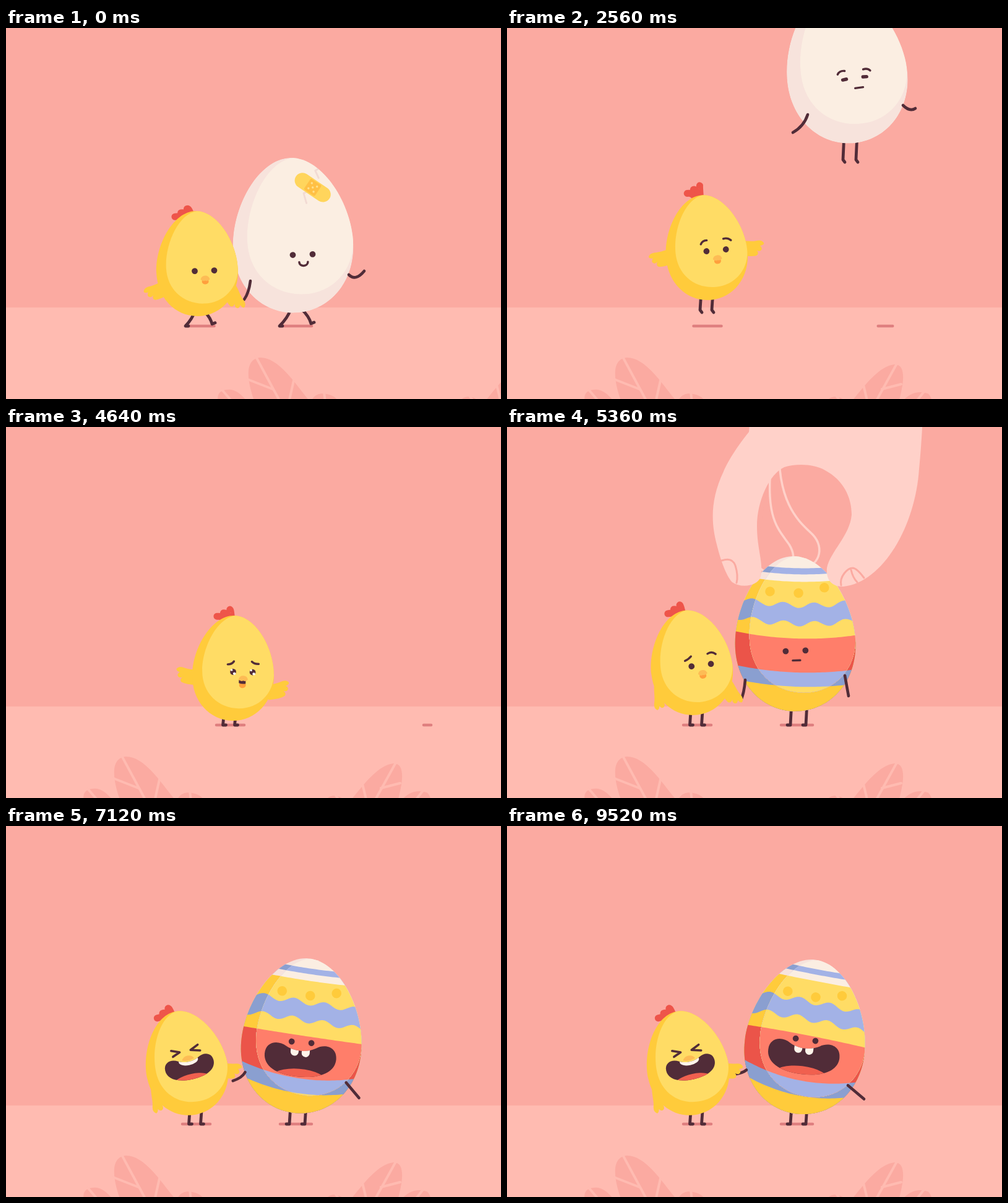
Write an HTML page with a canvas that moves like this. It is 800x600 px and loops after 9600 ms.

```html
<!DOCTYPE html>
<html lang="en">
<head>
<meta charset="utf-8">
<title>Chick and egg</title>
<style>
  html, body { margin: 0; width: 100%; height: 100%; overflow: hidden; background: #fbaaa1; }
  canvas { display: block; width: 800px; height: 600px; }
</style>
</head>
<body>
<canvas id="stage" width="800" height="600"></canvas>
<script>
const LOOP = 9600, STEP = 80;
const WALL = '#fbaaa1', FLOOR = '#ffbbb1', SKIN = '#ffd1c9', INK = '#512c38';
const SUN = '#ffdc65', AMBER = '#ffcb3b', RED = '#ee554a', CREAM = '#fbeee2', BLUSH = '#f7e3dc';
const LIT = { white: CREAM, blue: '#a3b2e6', yellow: SUN, red: '#ff7e6a' };
const DIM = { white: BLUSH, blue: '#8a9fd0', yellow: AMBER, red: '#eb5449' };

const ctx = document.getElementById('stage').getContext('2d');
const path = d => typeof d === 'string' ? new Path2D(d) : d;

function fill(d, color) { ctx.fillStyle = color; ctx.fill(path(d)); }
function line(d, width = 4, color = INK) {
  ctx.lineWidth = width;
  ctx.strokeStyle = color;
  ctx.stroke(path(d));
}
function oval(x, y, rx, ry, color) {
  ctx.fillStyle = color;
  ctx.beginPath();
  ctx.ellipse(x, y, rx, ry, 0, 0, 7);
  ctx.fill();
}
const dot = (x, y, r, color) => oval(x, y, r, r, color);
function at(x, y, deg, draw, sx = 1, sy = sx) {
  ctx.save();
  ctx.translate(x, y);
  ctx.rotate(deg * Math.PI / 180);
  ctx.scale(sx, sy);
  draw();
  ctx.restore();
}
function clipped(shape, draw) {
  ctx.save();
  ctx.clip(shape);
  draw();
  ctx.restore();
}

const mix = (a, b, u) => a + (b - a) * u;
function ramp(t, from, to) {
  const u = Math.min(1, Math.max(0, (t - from) / (to - from)));
  return u * u * (3 - 2 * u);
}

const SHELL = new Path2D('M0-97C35-97 66-45 66 0C66 42 37 73 0 73C-37 73-66 42-66 0C-66-45-35-97 0-97Z');
const GLOW = new Path2D('M4-97C-26-95-50-47-50-8C-50 29-23 53 10 53C42 53 66 28 66-4L90-4V-110H4Z');
function enlarge(p) {
  const q = new Path2D();
  q.addPath(p, new DOMMatrix().scale(1.475));
  return q;
}
const BIG_SHELL = enlarge(SHELL), BIG_GLOW = enlarge(GLOW);

// How far each part of the story has come, 0 to 1.
function story(t) {
  const back = ramp(t, 4720, 5200);
  const lifted = ramp(t, 2160, 2960), lowered = ramp(t, 4640, 5360);
  return {
    t, lifted, lowered, back,
    walk: 1 - ramp(t, 960, 1200),
    stop: ramp(t, 1040, 1360),
    away: ramp(t, 2240, 3040) - back,
    spread: ramp(t, 2240, 2560) - back,
    cry: ramp(t, 4240, 4480),
    reach: ramp(t, 960, 1680),
    grip: ramp(t, 1680, 1960),
    leave: ramp(t, 5600, 6320),
    gone: ramp(t, 2160, 2960) - ramp(t, 4240, 5360),
    hold: 1 - ramp(t, 2080, 2320) + ramp(t, 5360, 5680),
    giggle: ramp(t, 6560, 6800),
    roar: ramp(t, 6960, 7200),
    rock: .5 - .5 * Math.cos((t - 8040) / 400 * 2 * Math.PI),
    hop: t > 2480 && t < 4400 ? 52 * Math.abs(Math.sin(Math.PI * (t - 2480) / 480)) : 0,
    pace: t / 560 * 2 * Math.PI,
    painted: t >= 3600
  };
}

function handPose(s) {
  return s.painted
    ? { x: 90 - 124 * s.lowered + 79 * s.leave, y: -480 + 548 * s.lowered - 289 * s.leave }
    : { x: 20 - 20 * s.reach - 45 * s.grip + 190 * s.lifted, y: -210 + 210 * s.reach + 70 * s.grip - 550 * s.lifted };
}

function eggPose(s, hand) {
  const held = s.t >= 2160 && s.t < 5600;
  const x = held ? hand.x + 500 : s.painted ? 466 : 464 - 9 * s.stop;
  const y = held ? hand.y + 284 : s.painted ? 352 : 353 + s.stop;
  return {
    ground: x + (s.painted ? 2.5 : 5.5),
    air: Math.max(0, 348 - y),
    x: mix(x, 485.7 - 7.2 * s.rock, s.roar),
    y: mix(y, 358.5, s.roar) - 3 * s.walk * Math.abs(Math.sin(s.pace)),
    turn: s.painted ? mix(-2, 9.3 - 3.6 * s.rock, s.roar) : -2 - 6 * s.stop,
    fx: s.painted ? 0 : 15 - 4 * s.stop,
    fy: s.painted ? 10 - 23 * s.roar : 14 - 10 * s.stop
  };
}

function chickPose(s) {
  const x = 309 - 10 * s.stop + 68 * s.away;
  const y = 393 + 9 * s.cry * (1 - s.back);
  const turn = -2 - 7 * s.stop + 10 * s.away + 2 * s.back;
  return {
    ground: x + 5 + 3.5 * s.stop - 13 * s.away - s.hop * .11,
    x: mix(x, 305.9 - 19.8 * s.rock, s.giggle),
    y: mix(y, 391.5 + 5.4 * s.rock, s.giggle) - 3 * s.walk * Math.abs(Math.sin(s.pace)) - s.hop,
    turn: mix(turn, -2.6 - 14.4 * s.rock, s.giggle),
    fx: 4 * s.stop - 4,
    fy: -6 * s.stop
  };
}

function leaves(dx) {
  at(dx, 0, 0, () => {
    fill('M185 605C172 570 168 535 194 533C225 533 252 578 275 605Z', WALL);
    fill('M126 605C122 587 135 584 147 585C158 587 165 595 174 605Z', WALL);
    fill('M275 605C282 592 290 590 301 592C311 594 316 597 321 605Z', WALL);
    fill('M556 605C575 583 600 546 627 544C645 545 642 572 633 605Z', WALL);
    fill('M515 605C522 595 535 592 549 605Z', WALL);
    fill('M638 605C650 590 665 586 680 591C686 595 687 605 686 605Z', WALL);
    line('M186 530L228 608M173 568L214 584M248 570L240 606M132 585L150 606M297 588L299 606', 4, FLOOR);
    line('M631 541L594 608M575 573L583 606M637 576L606 584M531 593L540 606M674 588L660 606', 4, FLOOR);
  });
}

function shadow(x, width) {
  if (width > 5) line(`M${x - width / 2 + 2} 482H${x + width / 2 - 2}`, 4.5, '#df7f7f');
}

// Feet are offsets from the ground point; stride swings them apart while walking.
function legs(x, hipY, feet, stride, phase, lift, toe) {
  feet.forEach((f, i) => {
    const side = i ? 0 : Math.PI;
    const swing = stride * Math.cos(phase + side);
    const up = lift + Math.max(0, Math.sin(phase + side + .5)) * stride * .55;
    const hip = x + f + 1.5 - swing * .1, fx = x + f + swing, fy = 482 - up;
    const drop = lift > 3 ? 4 : up > 1 ? -2 : 0;
    line(`M${hip} ${hipY}Q${mix(hip, fx, .5) + stride * .3} ${(hipY + fy) / 2} ${fx} ${fy}l${toe * (lift > 3 ? 3 : 5)} ${drop}`, 4.8);
  });
}

function laughMouth(teeth) {
  const mouth = new Path2D('M-58-4C-58-24-38-28-24-19C-10-11 10-11 24-19C38-28 58-24 58-4C58 15 38 29 0 29C-38 29-58 15-58-4Z');
  fill(mouth, INK);
  clipped(mouth, () => {
    oval(0, 35, 46, 19, '#f0604f');
    teeth();
  });
}

// Three feathers fan out from one root; k raises them.
function comb(k) {
  const rx = mix(-6, 0, k);
  fill(`M${mix(-1, 9, k)}-95L${mix(-13, 4, k)}-100L${mix(-28, -14, k)}-88L0-80Z`, RED);
  for (let i = 0; i < 3; i++) {
    const x = mix(-13 - 10 * i, 4 - 11 * i, k), y = mix(-101 + 6 * i, -117 + 5 * i, k);
    line(`M${rx - 3 * i}-89Q${(rx + x) / 2} ${y - 1} ${x} ${y}`, 11, RED);
  }
}

function wing(x, y, lift, side) {
  at(x * side, y, lift * side, () => fill(
    'M8-12C-6-11-14-6-25-6Q-33-5-34 1Q-32 4-27 3Q-31 9-26 11Q-23 12-20 9Q-23 15-18 17Q-10 18 8 11Z', AMBER), side, 1);
}

function wings(s) {
  const { stop, spread, cry, giggle } = s;
  wing(mix(-54, -60, spread), mix(25, 7 * cry - 4, spread), mix(-8 - 64 * stop, 4 + 18 * cry, spread), 1);
  wing(mix(-54, -60, spread), mix(34 - 24 * giggle, 31 * cry - 6, spread), mix(-53 + 49 * giggle, 8 + 20 * cry, spread), -1);
}

function beak(x, y, open) {
  at(x, y, 0, () => {
    if (open) {
      oval(-1, 9, 5.5, 5, '#ffa03c');
      fill('M-7 1H4V7Q-2 8-7 6Z', INK);
    } else {
      oval(0, 3.5, 5.5, 4.5, '#ff9f3d');
    }
    fill('M-7.5 0Q-6-6 0-6Q6-6 7.5 0Q4 4 0 2Q-4 4-7.5 0Z', '#fdbc55');
  });
}

function chickFace(t, x, y) {
  if (t >= 6640) {
    line('M-19-36L-6-31L-18-26M25-37L12-31L27-27', 3.6);
    at(5, -4, 0, () => laughMouth(() => oval(0, -16, 23, 11, '#fff4ea')), .69);
    fill('M-5-17Q-2-23 5-23Q12-23 15-17Q5-13-5-17Z', '#fdbc55');
    return;
  }
  const sad = t >= 4320 && t < 4960;
  at(x, y, 0, () => {
    for (const ex of [0, 31.5]) {
      dot(ex, 0, 4.9, INK);
      if (sad) {
        dot(ex - 2.5, -3, 1.8, '#fff');
        dot(ex + 2, 2.8, 2.2, '#fff');
      }
    }
    if (sad) line('M-9-12Q-2-12 1-17M30-17Q34-13 41-13.5', 3.4);
    else if (t >= 4960) line('M-9.5-10Q-3-12 1-16M28-17Q35-21 41-15', 3.4);
    else if (t >= 1200) line('M-8-12Q-5-18 2-17.5M29-17.5Q36-19 41-14', 3.4);
    beak(16.5, sad ? 12 : 14, sad);
  });
}

function chick(s, c) {
  legs(c.ground, c.y + 66, [-12, 7], 12 * s.walk, s.pace, s.hop, 1);
  at(c.x, c.y, c.turn, () => {
    comb(.35 * s.stop + s.hop * .0145 - .15 * s.giggle);
    wings(s);
    fill(SHELL, AMBER);
    clipped(SHELL, () => fill(GLOW, SUN));
    chickFace(s.t, c.fx, c.fy);
  });
}

// A stripe around the shell; a wide mouth pushes stripes apart at the middle.
function stripe(level, x, push) {
  const bulge = 14 * push * Math.tanh((level - 20) / 30) * Math.cos(level / 100);
  return level + .07 * x - .0009 * x * x + bulge * (1 - (x / 98) ** 2);
}
const ripple = x => -4.5 * Math.cos((x + 66) / 49 * 2 * Math.PI);

function paint(colors, push) {
  const below = (level, color, wavy) => {
    let d = 'M-110 130';
    for (let x = -110; x <= 110; x += 4) d += `L${x} ${stripe(level, x, push) + (wavy ? ripple(x) : 0)}`;
    fill(d + 'L110 130Z', colors[color]);
  };
  ctx.fillStyle = colors.white;
  ctx.fillRect(-110, -160, 220, 290);
  below(-124, 'blue');
  below(-114, 'white');
  below(-102, 'yellow');
  for (const x of [-38, 8, 50]) dot(x, -83 - x * x * .003, 7.8, AMBER);
  below(-64, 'blue', true);
  below(-34, 'yellow', true);
  below(-10, 'red');
  below(45, 'blue');
  below(68, 'yellow');
}

function bandage(x, y) {
  at(x, y, 0, () => {
    line('M14-32L5-27L10-15M-4 4L-15 9L-11 25', 3, '#f2dbd4');
    at(0, 0, 36, () => {
      line('M-20 0H20', 25, '#ffd55c');
      line('M-8-8H8V8H-8Z', 5, '#ffc045');
      fill('M-8-8H8V8H-8Z', '#ffc045');
      dot(0, 0, 1.7, '#ffe08a');
      for (const a of [-5, 5]) for (const b of [-5, 5]) dot(a, b, 1.7, '#ffe08a');
    });
  });
}

function eggFace(t, x, y) {
  at(x, y, 0, () => {
    if (t >= 1200 && t < 3600) {
      line('M-19 0L-13-.5M14-.5L20 0', 5.4);
      line('M-26-10Q-22-16-14-14M16-12.5Q23-14 27-9', 3.4);
      line('M-1 16H12', 3.2);
      return;
    }
    dot(-16, 0, 4.9, INK);
    dot(16, 0, 4.9, INK);
    if (t < 1200) line('M-6 12C-6 20 8 20 8 12', 3.5);
    else if (t < 7040) line('M-5 15.5H7', 3.4);
    else at(0, 27, 0, () => laughMouth(() => line('M-10-20V-11M8-20V-10', 13, '#fff4ea')));
  });
}

function egg(s, e) {
  legs(e.ground, e.y + 102, s.painted ? [-10.5, 14.5] : [-12.5, 8.5], 15 * s.walk, s.pace, e.air, s.painted ? -1 : 1);
  at(e.x, e.y, e.turn, () => {
    clipped(BIG_SHELL, () => {
      if (s.painted) paint(DIM, s.roar); else fill(BIG_SHELL, BLUSH);
      clipped(BIG_GLOW, () => {
        if (s.painted) paint(LIT, s.roar); else fill(BIG_GLOW, CREAM);
      });
      if (!s.painted) bandage(35 + 6 * s.stop, -94 - 11 * s.stop);
    });
    eggFace(s.t, e.fx, e.fy);
  });
}

function eggArms(s, e, c) {
  const { stop, roar, hold } = s;
  at(e.x, e.y, 0, () => line(s.painted
    ? `M${80 - 10 * roar} ${50 + 11 * roar}L${86 + 10 * roar} 83`
    : `M90 46Q101 57 ${115 - 5 * stop} ${40 + 11 * stop}`, 4.6));
  const x = e.x + (s.painted ? -81 - 13 * roar : -69 + 5 * stop);
  const y = e.y + (s.painted ? 57 - 21 * roar : 56 + 5 * stop);
  const hx = mix(e.x - 88, c.x + 76 - 3 * roar, hold);
  const hy = mix(e.y + 90, c.y + 46 - 39 * roar, hold);
  line(`M${x} ${y}Q${mix(x, hx, .25)} ${mix(y, hy, .65)} ${hx} ${hy}`, 4.6);
}

function backFingers() {
  const far = 'M474-40C470 60 510 88 528 106C549 128 538 160 508 160C496 160 490 155 480 150';
  const near = 'M462-20C450 80 472 96 490 122C506 148 490 170 468 170C452 170 440 160 435 150';
  for (const d of [far, near]) {
    fill(d, WALL);
    line(d, 3.5, SKIN);
  }
}

function frontFingers() {
  fill('M720-600H470L425-60C402-32 388-6 384 4C362 50 364 88 373 122C381 155 391 176 398 183' +
    'C412 193 439 190 444 174C449 152 438 130 438 92C438 52 458 8 482-3C500-9 530-9 548 2' +
    'C578 18 591 46 591 74C588 108 556 134 551 160C549 182 562 191 578 190' +
    'C642 183 694 92 700 0C706-60 714-200 720-600Z', SKIN);
  line('M381 148Q398 142 403 156Q408 172 405 184M574 188C571 174 584 160 593 160Q600 161 611 176M590 163Q593 176 600 183', 3, WALL);
}

function draw(t) {
  const s = story(t);
  const hand = handPose(s), e = eggPose(s, hand), c = chickPose(s);

  ctx.lineCap = ctx.lineJoin = 'round';
  ctx.fillStyle = WALL;
  ctx.fillRect(0, 0, 800, 600);
  ctx.fillStyle = FLOOR;
  ctx.fillRect(0, 452, 800, 148);
  leaves(217 * Math.max(0, 1 - t / 1120) ** 1.6);
  shadow(c.ground, 49);
  shadow((s.painted ? 468.5 : 468.5 - 7 * s.stop) + 300 * s.gone, 55 * (1 - s.gone));

  at(hand.x, hand.y, 0, backFingers);
  egg(s, e);
  eggArms(s, e, c);
  at(hand.x, hand.y, 0, frontFingers);
  chick(s, c);
}

const start = performance.now();
function tick() {
  const t = (performance.now() - start) % LOOP;
  draw(Math.floor(t / STEP) * STEP);
  requestAnimationFrame(tick);
}
tick();
</script>
</body>
</html>
```
